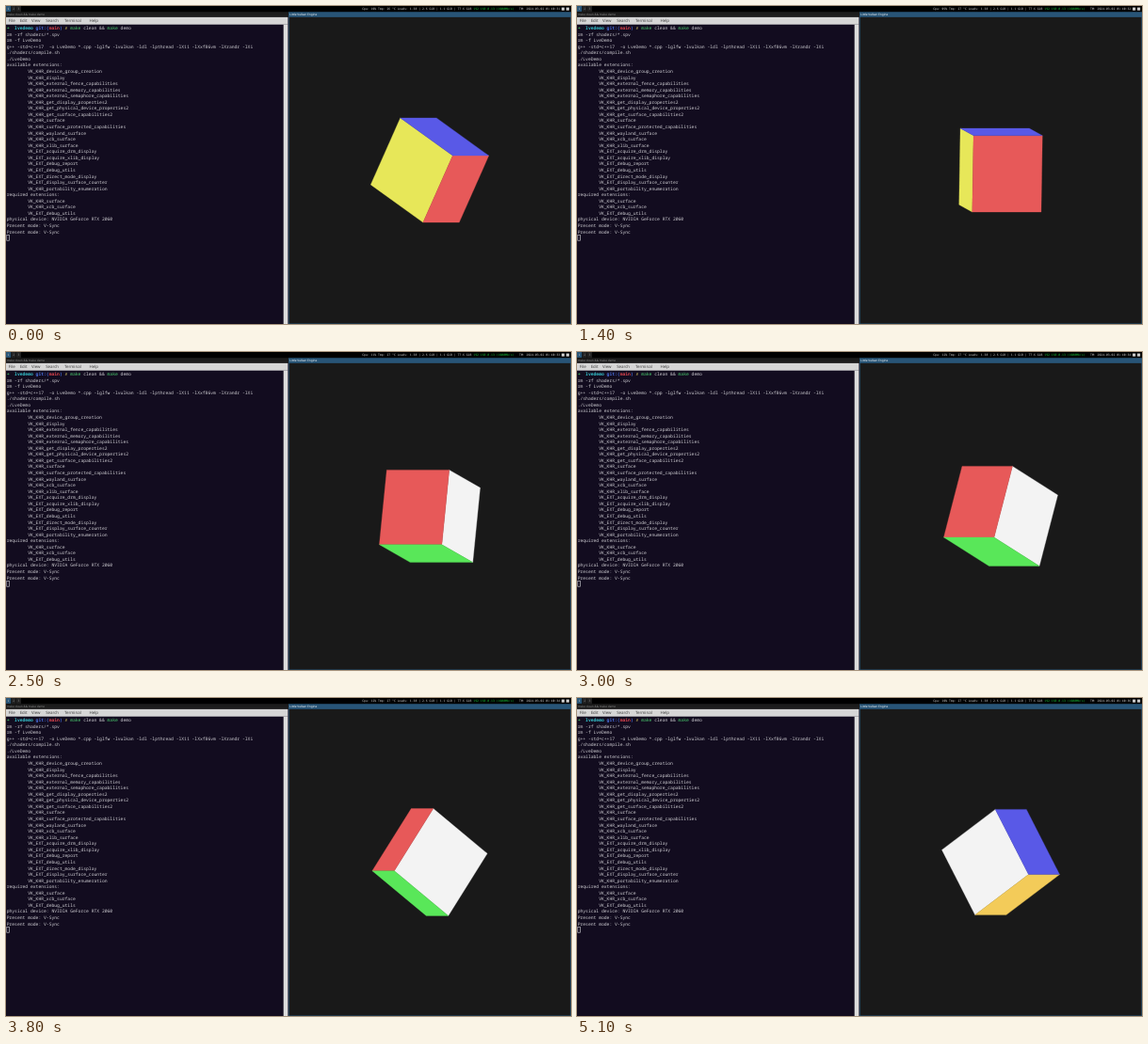
Write an HTML page that moves like this. It is 600 px wide and 338 px high and loops after 5200 ms.

```html
<!DOCTYPE html>
<html lang="en">
<head>
<meta charset="utf-8">
<title>Rotating cube</title>
<style>
  html, body { margin: 0; width: 100%; height: 100%; overflow: hidden; background: #000; }
  svg { display: block; width: 600px; height: 338px; }
  text { white-space: pre; text-rendering: geometricPrecision; }
  .mono { font: 15px "Noto Sans Mono", "DejaVu Sans Mono", monospace; fill: #d0cfd4; }
  .bar { font: 10px "Noto Sans Mono", "DejaVu Sans Mono", monospace; fill: #d8d8d8; }
  .title { font: 10px "Noto Sans", "Open Sans", sans-serif; }
  .menu { font: 14px "Noto Sans", "Open Sans", sans-serif; fill: #444; }
  #cube polygon { stroke-width: 1; stroke-linejoin: round; }
</style>
</head>
<body>
<svg viewBox="0 0 1920 1081.6">
  <!-- status bar -->
  <rect width="1920" height="20" fill="#000"/>
  <rect width="17" height="19" fill="#285577"/>
  <rect x="18" width="16" height="19" fill="#222"/>
  <rect x="35" width="16" height="19" fill="#222"/>
  <text class="bar" y="14"><tspan x="5">1</tspan><tspan x="23" fill="#888">2</tspan><tspan x="40" fill="#888">3</tspan></text>
  <text class="bar" id="load" x="1210" y="14"></text>
  <text class="bar" x="1588" y="14" fill="#0f0" style="fill:#18c838">192.168.0.13 (1000Mb/s)</text>
  <text class="bar" id="clock" x="1744" y="14"></text>
  <rect x="1888" y="5" width="10" height="10" fill="#ccc"/>
  <rect x="1904" y="5" width="10" height="10" fill="#ccc"/>

  <!-- terminal -->
  <rect y="20" width="960" height="18" fill="#1c1c1c"/>
  <text class="title" x="3" y="33" fill="#888">make clean &amp;&amp; make demo</text>
  <rect y="38" width="960" height="1044" fill="#120c1f"/>
  <rect y="38" width="958" height="25" fill="#d6d6d6"/>
  <text class="menu" y="55"><tspan x="9">File</tspan><tspan x="47">Edit</tspan><tspan x="86">View</tspan><tspan x="135">Search</tspan><tspan x="198">Terminal</tspan><tspan x="283">Help</tspan></text>
  <rect x="943" y="63" width="15" height="1019" fill="#dcdcdc"/>
  <g id="term"></g>
  <rect x="2.5" y="778.5" width="9" height="19" fill="none" stroke="#d0cfd4" stroke-width="2"/>

  <!-- cube window -->
  <rect x="960" y="20" width="960" height="1062" fill="#285577"/>
  <text class="title" x="964" y="33" fill="#fff">Little Vulkan Engine</text>
  <rect x="962" y="38" width="956" height="1042" fill="#191919"/>
  <g id="cube"></g>
</svg>
<script>
const NS = "http://www.w3.org/2000/svg";
const byId = id => document.getElementById(id);

function add(parent, tag, attrs, content = "") {
  const el = document.createElementNS(NS, tag);
  for (const k in attrs) el.setAttribute(k, attrs[k]);
  el.textContent = content;
  return parent.appendChild(el);
}

// Terminal text on a 9 x 21 cell grid
const term = byId("term");
const put = (row, col, str, style = "") =>
  add(term, "text", { class: "mono", x: 2 + col * 9, y: 80 + row * 21, style }, str);

[
  [0, "➜", "#4be070"], [3, "lvedemo", "#35c5cf;font-weight:bold"], [11, "git:(", "#4a6fe0;font-weight:bold"],
  [16, "main", "#e0454f;font-weight:bold"], [20, ")", "#4a6fe0;font-weight:bold"], [22, "✗", "#e0d060"],
  [24, "make", "#4bd070"], [29, "clean &&"], [38, "make", "#4bd070"], [43, "demo"]
].forEach(([col, str, fill]) => put(0, col, str, fill ? "fill:" + fill : ""));

const khr = `device_group_creation display external_fence_capabilities external_memory_capabilities
  external_semaphore_capabilities get_display_properties2 get_physical_device_properties2
  get_surface_capabilities2 surface surface_protected_capabilities wayland_surface xcb_surface xlib_surface`;
const ext = `acquire_drm_display acquire_xlib_display debug_report debug_utils direct_mode_display
  display_surface_counter`;
const names = (prefix, list) => list.split(/\s+/).map(n => "\t" + prefix + n);

[
  "rm -rf shaders/*.spv",
  "rm -f LveDemo",
  "g++ -std=c++17  -o LveDemo *.cpp -lglfw -lvulkan -ldl -lpthread -lX11 -lXxf86vm -lXrandr -lXi",
  "./shaders/compile.sh",
  "./LveDemo",
  "available extensions:",
  ...names("VK_KHR_", khr),
  ...names("VK_EXT_", ext),
  "\tVK_KHR_portability_enumeration",
  "required extensions:",
  ...names("VK_KHR_", "surface xcb_surface"),
  "\tVK_EXT_debug_utils",
  "physical device: NVIDIA GeForce RTX 2060",
  "Present mode: V-Sync",
  "Present mode: V-Sync"
].forEach((line, i) => put(i + 1, line[0] === "\t" ? 8 : 0, line.trim()));

// Cube: face colours as [positive, negative] side of the x, y and z axes
const colors = [["#e7e759", "#f3f3f3"], ["#e75959", "#f3cb59"], ["#5959e7", "#59e759"]];
const faces = colors.map(() => add(byId("cube"), "polygon", {}));
const CX = 1440, CY = 558.4, W = 238.4, H = 260.8;

function drawCube(yaw) {
  const pitch = yaw / 2;
  const c1 = Math.cos(yaw), s1 = Math.sin(yaw), c2 = Math.cos(pitch), s2 = Math.sin(pitch);
  const axes = [[c1, 0, -s1], [s1 * s2, c2, c1 * s2], [c2 * s1, -s2, c1 * c2]];
  faces.forEach((face, i) => {
    const n = axes[i], u = axes[(i + 1) % 3], v = axes[(i + 2) % 3];
    const side = n[2] < 0 ? 1 : -1;   // the side turned to the viewer
    const at = (k, a, b) => (side * n[k] + a * u[k] + b * v[k]) / 2;
    const points = [[-1, -1], [1, -1], [1, 1], [-1, 1]].map(([a, b]) =>
      (CX + W * at(0, a, b)).toFixed(2) + "," + (CY + H * at(1, a, b)).toFixed(2));
    const color = colors[i][side > 0 ? 0 : 1];
    face.setAttribute("points", points.join(" "));
    face.setAttribute("fill", color);
    face.setAttribute("stroke", color);
  });
}

const LOOP = 5200, STEP = 100;
const START = 121 * Math.PI / 180, TURN = 0.06;   // radians per step
const cpu = [10, 9, 11, 12, 11, 10];
let last = -1;

function tick(now) {
  const step = Math.floor(now % LOOP / STEP);
  if (step !== last) {
    last = step;
    drawCube(START + TURN * step);
    const sec = Math.floor(step * STEP / 1000);
    byId("load").textContent =
      `Cpu: ${String(cpu[sec]).padStart(2, "0")}% Tmp: ${step < 6 ? 26 : 27} °C Loads: 1.38 | 2.6 GiB | 1.1 GiB | 77.6 GiB`;
    byId("clock").textContent = `TM: 2024-03-02 01:40:${31 + sec}`;
  }
  requestAnimationFrame(tick);
}

const begin = performance.now();
const frame = () => tick(Math.max(0, performance.now() - begin));
frame();
</script>
</body>
</html>
```
